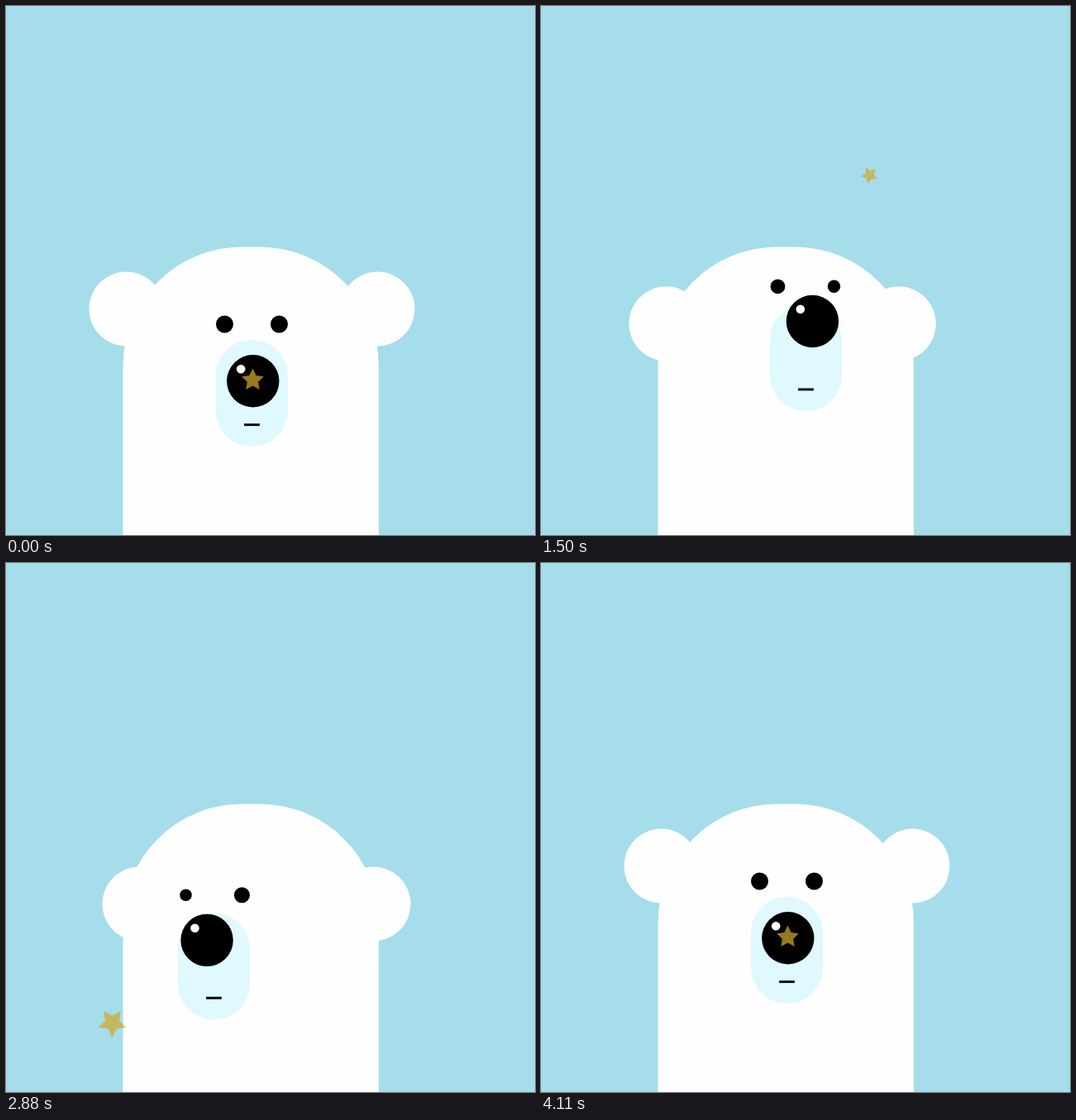
Recreate the animation shown at these times as an HTML page with a canvas. Size 640 by 640 pixels, loop 4.56 s.

```html
<!DOCTYPE html>
<html lang="en">
<head>
<meta charset="utf-8">
<title>Bear and star</title>
<style>
html, body { margin: 0; width: 100%; height: 100%; overflow: hidden; background: #a5ddea; }
canvas { display: block; width: 100vmin; height: 100vmin; }
</style>
</head>
<body>
<canvas id="stage" width="640" height="640"></canvas>
<script>
const ctx = document.getElementById('stage').getContext('2d');
const LOOP = 4560, STEP = 30, WHITE = '#fefefe';

// look: shift of the face; nose: lean on the muzzle (x, lift);
// ears: shift, tuck, drop; star: place; shine: radius, turn
const home = { look: [0, 0], nose: [0, 0], ears: [0, 0, 0], star: [298.5, 452.6], shine: [14, 0] };
const stops = [
  { ...home, go: 0, end: 0 },
  { go: 0, end: 450, look: [-36, -15], nose: [-14, 19], ears: [9, 5, 11], star: [132.5, 254.3], shine: [2, 45] },
  { go: 510, end: 1110, look: [54, -14], nose: [14.7, 21], ears: [-12, 5, 11.5], star: [486, 222], shine: [17.4, 90] },
  { go: 1170, end: 1770, look: [0, -64], nose: [0.7, 36], ears: [-0.5, 16, 22.5], star: [332, 191.5], shine: [6, 138] },
  { go: 2040, end: 2640, look: [-46, 19.6], nose: [-9.7, 17], ears: [5.5, 10.5, 46], star: [128.5, 556.4], shine: [20, 201] },
  { go: 2880, end: 3270, look: [44, 20.6], nose: [14.2, 18.4], ears: [-13, 12, 47], star: [532.6, 562], shine: [14, 335] },
  { ...home, go: 3510, end: 4110, shine: [14, 432] }
];

const clamp = p => Math.max(0, Math.min(1, p));
const ease = p => p * p * (3 - 2 * p);
const mix = (a, b, p) => a.map((v, i) => v + (b[i] - v) * p);

function poseAt(t) {
  const i = Math.max(1, stops.findIndex(s => t <= s.end));
  const from = stops[i - 1], to = stops[i];
  const move = ease(clamp((t - to.go) / (to.end - to.go)));
  const drift = (t - from.end) / (to.end - from.end);
  const pose = {};
  for (const key in home) pose[key] = mix(from[key], to[key], key === 'shine' ? drift : move);
  return pose;
}

function disc(x, y, r, color) {
  ctx.fillStyle = color;
  ctx.beginPath();
  ctx.arc(x, y, r, 0, 2 * Math.PI);
  ctx.fill();
}

function box(x, y, w, h, radii, color) {
  ctx.fillStyle = color;
  ctx.beginPath();
  ctx.roundRect(x, y, w, h, radii);
  ctx.fill();
}

function drawStar([x, y], [r, degrees]) {
  ctx.fillStyle = 'rgba(210, 169, 42, 0.72)';
  ctx.beginPath();
  for (let i = 0; i < 10; i++) {
    const a = (degrees - 90 + i * 36) * Math.PI / 180;
    const d = i % 2 ? r * 0.5 : r;
    ctx.lineTo(x + d * Math.cos(a), y + d * Math.sin(a));
  }
  ctx.fill();
}

function drawBear({ look: [dx, dy], nose: [lean, lift], ears: [shift, tuck, drop] }) {
  const x = 297.5 + dx, turned = Math.min(1, lift / 18);
  const sides = [-1, 1];

  for (const s of sides) disc(297.5 + shift + s * (152 - tuck), 366.5 + drop, 45, WHITE);
  box(141.5, 291.5, 309.5, 360, [144, 144, 0, 0], WHITE);

  // the eye on the far side of a turned head looks smaller
  for (const s of sides) {
    const r = 10.5 - 2.2 * turned - s * dx * 0.025;
    disc(x + s * (33 + turned), 385 + dy - 3 * turned, r, '#000');
  }

  box(x - 43.5, 404 + dy, 87, 129, 43.5, '#e0f8ff');
  box(x - 9.4, 505.2 + dy, 18.8, 2.9, 0, '#000');

  const nx = x + 1.3 + lean, ny = 453.8 + dy - lift;
  disc(nx, ny, 31.7, '#000');
  disc(nx - 14.6, ny - 14.6, 5.3, WHITE);
}

function draw(now) {
  const t = Math.min(4110, Math.floor(now % LOOP / STEP) * STEP);
  const pose = poseAt(t);
  ctx.fillStyle = '#a5ddea';
  ctx.fillRect(0, 0, 640, 640);
  drawBear(pose);
  drawStar(pose.star, pose.shine);
}

const begin = performance.now();
function frame() {
  draw(performance.now() - begin);
  requestAnimationFrame(frame);
}
frame();
</script>
</body>
</html>
```
